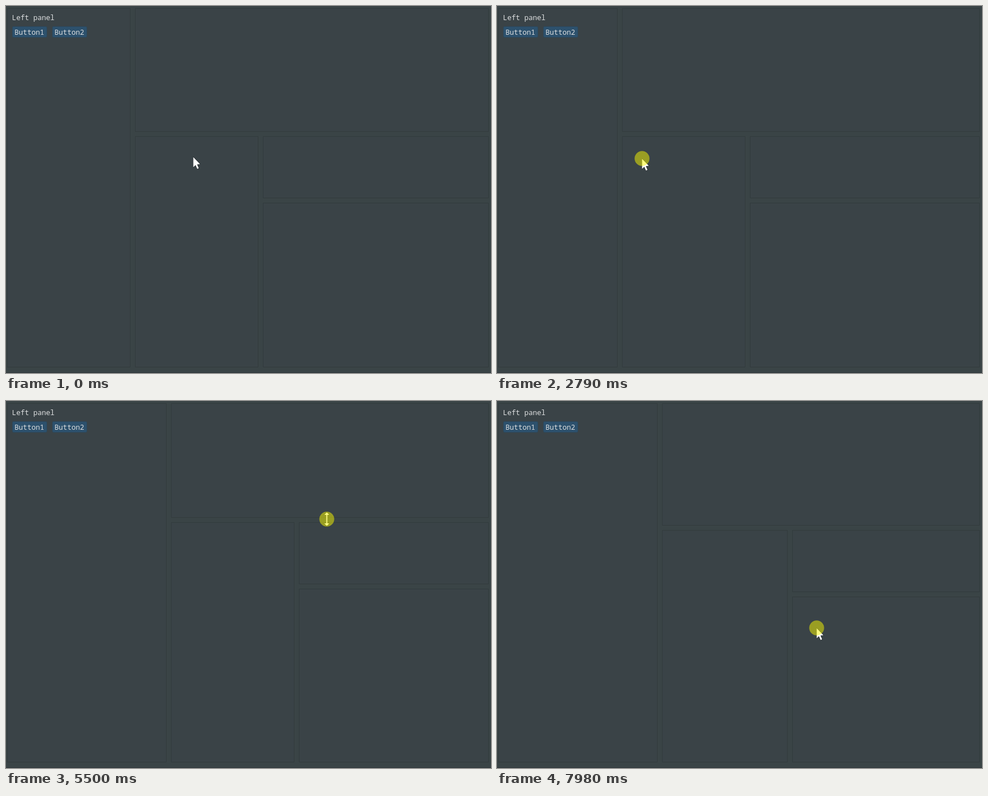
An HTML page with a canvas that plays this animation: 861x651 px, repeating every 8 s.

```html
<!DOCTYPE html>
<html lang="en">
<head>
<meta charset="utf-8">
<title>Resizable panels</title>
<style>
  html, body { margin: 0; width: 100%; height: 100%; overflow: hidden; background: #3a4446; }
  canvas { display: block; width: 861px; height: 651px; }
</style>
</head>
<body>
<canvas id="stage" width="861" height="651"></canvas>
<script>
const ctx = document.getElementById('stage').getContext('2d');
const LOOP = 8000, STEP = 77.4;

// Eased pointer moves; the pointer rests between them
const home = { x: 332, y: 267 };
const moves = [
  { from: 0, to: 11, x: 228, y: 241 },
  { from: 15, to: 17, x: 226, y: 245 },
  { from: 21, to: 28, x: 328, y: 262 },
  { from: 28, to: 30.35, x: 141, y: 270 },
  { from: 32, to: 38, x: 297, y: 270 },
  { from: 38, to: 42, x: 267, y: 262 },
  { from: 42, to: 43.39, x: 290, y: 272 },
  { from: 49, to: 59, x: 567, y: 231 },
  { from: 59, to: 61, x: 569, y: 227 },
  { from: 66, to: 71, x: 569, y: 209 },
  { from: 71, to: 76, x: 566, y: 241 },
  { from: 76, to: 77.72, x: 563, y: 339 },
  { from: 79, to: 85, x: 564, y: 225 },
  { from: 89, to: 97, x: 516, y: 394 },
  { from: 102, to: 103, x: 567, y: 402 }
];

// Steps during which the button is held on each splitter
const drags = { left: [17, 47], row: [64, 88], mid: [99, 104] };

const clamp = (v, lo, hi) => Math.max(lo, Math.min(hi, v));
const within = (k, [a, b]) => k >= a && k <= b;
const ease = u => u * u * (3 - 2 * u);

function pointer(k) {
  let { x, y } = home;
  for (const m of moves) {
    const f = ease(clamp((k - m.from) / (m.to - m.from), 0, 1));
    x += (m.x - x) * f;
    y += (m.y - y) * f;
  }
  return { x: Math.round(x), y: Math.round(y) };
}

// A dragged splitter trails the pointer by one step
const trail = (k, [a, b]) => pointer(clamp(k - 1, a, b));

function layout(k) {
  const left = trail(k, drags.left).x - 6;
  const row = trail(k, drags.row).y - 5;
  const widened = k > 102 ? 4 : 0;
  return { left, row, mid: left + 227 + widened };
}

function box(x1, y1, x2, y2) {
  ctx.fillStyle = '#3a4347';
  ctx.fillRect(x1, y1, x2 - x1 + 1, y2 - y1 + 1);
  ctx.strokeStyle = '#323b3d';
  ctx.lineWidth = 1;
  ctx.strokeRect(x1 + 0.5, y1 + 0.5, x2 - x1, y2 - y1);
}

function label(text, x, y) {
  ctx.font = '12.6px "Noto Sans Mono", "DejaVu Sans Mono", monospace';
  ctx.fillStyle = '#dcdedf';
  ctx.fillText(text, x, y);
}

function button(text, x, w) {
  ctx.beginPath();
  ctx.roundRect(x + 0.5, 36.5, w - 1, 19, 2);
  ctx.fillStyle = '#2d516d';
  ctx.fill();
  ctx.strokeStyle = '#2c475c';
  ctx.lineWidth = 1;
  ctx.stroke();
  label(text, x + 4, 51);
}

function shape(points, x, y, turn) {
  ctx.save();
  ctx.translate(x, y);
  if (turn) ctx.rotate(Math.PI / 2);
  ctx.beginPath();
  points.forEach(([px, py]) => ctx.lineTo(px, py));
  ctx.closePath();
  ctx.lineJoin = 'round';
  ctx.lineWidth = 1.2;
  ctx.strokeStyle = '#1c2226';
  ctx.stroke();
  ctx.fillStyle = '#fff';
  ctx.fill();
  ctx.restore();
}

const arrow = [[0, 0.5], [0, 18.5], [4, 14.7], [7, 21.5], [9.7, 20.3], [6.8, 13.6], [12, 13]];
const half = [[-12, 0], [-7.5, -4.5], [-7.5, -1], [7.5, -1], [7.5, -4.5], [12, 0]];
const resize = half.concat(half.slice(1, -1).reverse().map(([x, y]) => [x, -y]));

function cursorKind(k) {
  const now = pointer(k), old = pointer(k - 1);
  if (within(k, [17, 49])) return Math.abs(now.x - old.x) > 4 ? 'arrow' : 'h';
  if (within(k, [59, 89])) return k > 64 && Math.abs(now.y - old.y) > 4 ? 'arrow' : 'v';
  return within(k, [97, 102]) ? 'h' : 'arrow';
}

function draw(k) {
  const { left, row, mid } = layout(k);
  ctx.fillStyle = '#3a4446';
  ctx.fillRect(0, 0, 861, 651);
  ctx.fillStyle = '#2d3539';
  ctx.fillRect(0, 650, 861, 1);

  box(2, 4, left, 640);
  box(left + 9, 4, 856, row);
  box(left + 9, row + 9, mid, 640);
  box(mid + 9, row + 9, 856, row + 118);
  box(mid + 9, row + 127, 856, 640);

  label('Left panel', 10.6, 24.5);
  button('Button1', 11, 62);
  button('Button2', 82, 62);

  const { x, y } = pointer(k), kind = cursorKind(k);
  shape(kind === 'arrow' ? arrow : resize, x + 0.5, y + 0.5, kind === 'v');

  if (Object.values(drags).some(d => within(k, d))) {
    ctx.beginPath();
    ctx.arc(x + 0.5, y + 0.5, 13.2, 0, Math.PI * 2);
    ctx.fillStyle = 'rgba(250, 250, 0, 0.5)';
    ctx.fill();
  }
}

const start = performance.now();
function tick() {
  const t = (performance.now() - start) % LOOP;
  draw(Math.min(103, Math.floor(t / STEP + 0.1)));
  requestAnimationFrame(tick);
}
tick();
</script>
</body>
</html>
```
